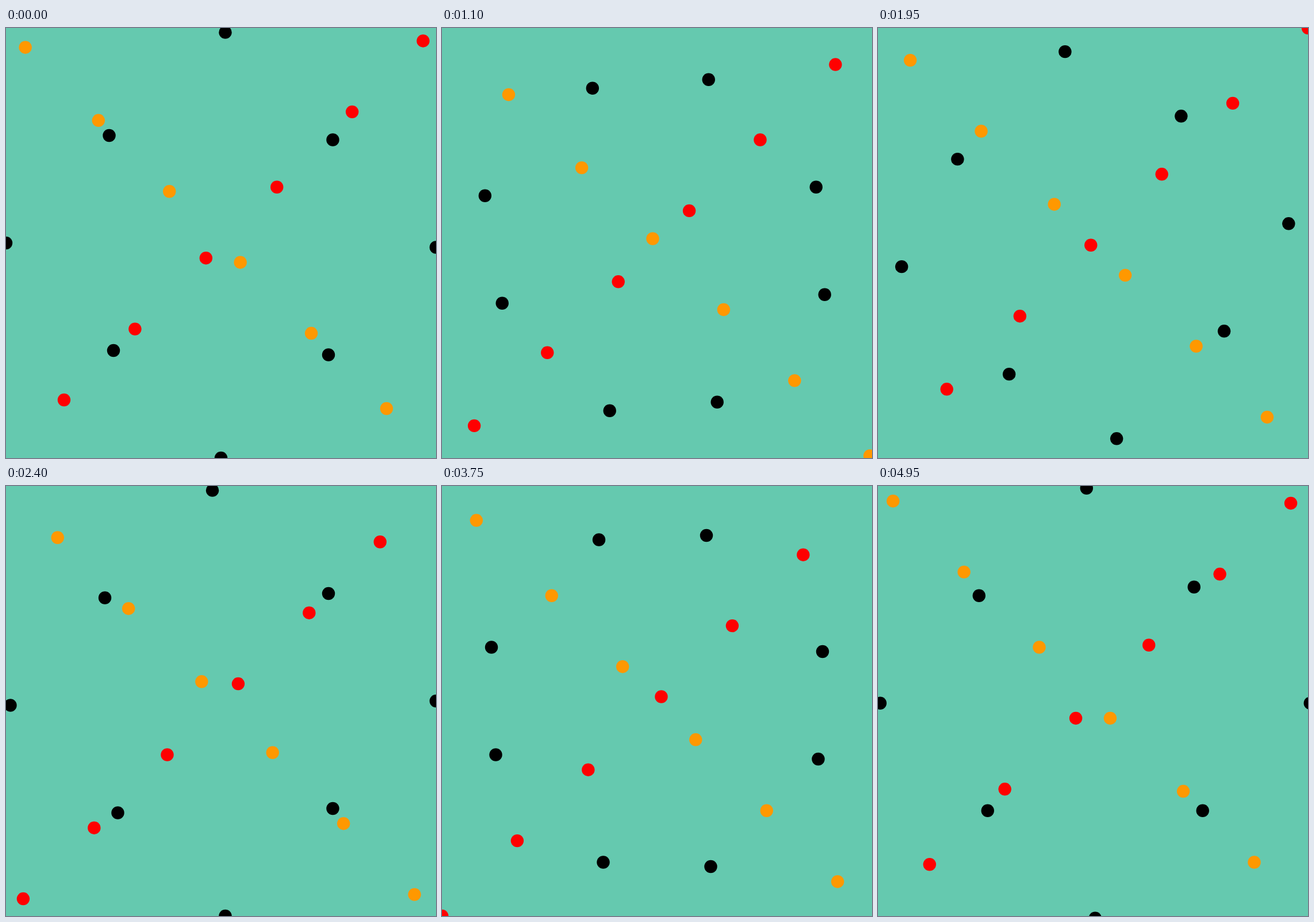
An HTML page without scripts for the animation above (5 s loop, 748 px wide and 748 px high).

```html
<!DOCTYPE html>
<html lang="en">
<head>
<meta charset="utf-8">
<title>Bouncing dots</title>
<style>
  @property --tick { syntax: "<integer>"; inherits: true; initial-value: 0; }

  html, body { margin: 0; width: 100%; height: 100%; overflow: hidden; background: #65c9af; }

  svg {
    display: block;
    width: 100%;
    height: 100%;
    animation: run 5s steps(100) infinite;
  }
  @keyframes run { from { --tick: 0; } to { --tick: 100; } }

  /* Every dot moves one unit per tick on a 200-unit stage. */
  circle {
    r: 3px;
    --px: calc(var(--x) + var(--dx) * var(--tick));
    --py: calc(var(--y) + var(--dy) * var(--tick));
    transform: translate(calc(var(--cx) * 1px), calc(var(--cy) * 1px));
  }

  /* Reflect one unit beyond each edge. */
  .bounce circle {
    --cx: max(min(var(--px), 402 - var(--px)), -2 - var(--px));
    --cy: max(min(var(--py), 402 - var(--py)), -2 - var(--py));
  }

  /* Jump from 200 back to 0 along a diagonal. */
  .wrap circle {
    --y: 0;
    --dx: 1;
    --dy: 0;
    --cx: calc(var(--px) - 201 * clamp(0, var(--px) - 200, 1));
  }
  .falling circle { --cy: var(--cx); }
  .rising circle { --cy: calc(200 - (var(--cx))); }

  .se { --dx: 1; --dy: 1; }
  .sw { --dx: -1; --dy: 1; }
  .nw { --dx: -1; --dy: -1; }
  .ne { --dx: 1; --dy: -1; }
</style>
</head>
<body>
<svg viewBox="0 0 200 200">
  <g class="wrap falling" fill="#ff9800">
    <circle r="3" style="--x:9"/>
    <circle r="3" style="--x:43"/>
    <circle r="3" style="--x:76"/>
    <circle r="3" style="--x:109"/>
    <circle r="3" style="--x:142"/>
    <circle r="3" style="--x:177"/>
  </g>
  <g class="wrap rising" fill="#f00">
    <circle r="3" style="--x:27"/>
    <circle r="3" style="--x:60"/>
    <circle r="3" style="--x:93"/>
    <circle r="3" style="--x:126"/>
    <circle r="3" style="--x:161"/>
    <circle r="3" style="--x:194"/>
  </g>
  <g class="bounce" fill="#000">
    <circle r="3" class="se" style="--x:102;--y:2"/>
    <circle r="3" class="se" style="--x:152;--y:52"/>
    <circle r="3" class="sw" style="--x:200;--y:102"/>
    <circle r="3" class="sw" style="--x:150;--y:152"/>
    <circle r="3" class="nw" style="--x:100;--y:200"/>
    <circle r="3" class="nw" style="--x:50;--y:150"/>
    <circle r="3" class="nw" style="--x:0;--y:100"/>
    <circle r="3" class="ne" style="--x:48;--y:50"/>
  </g>
</svg>
</body>
</html>
```
